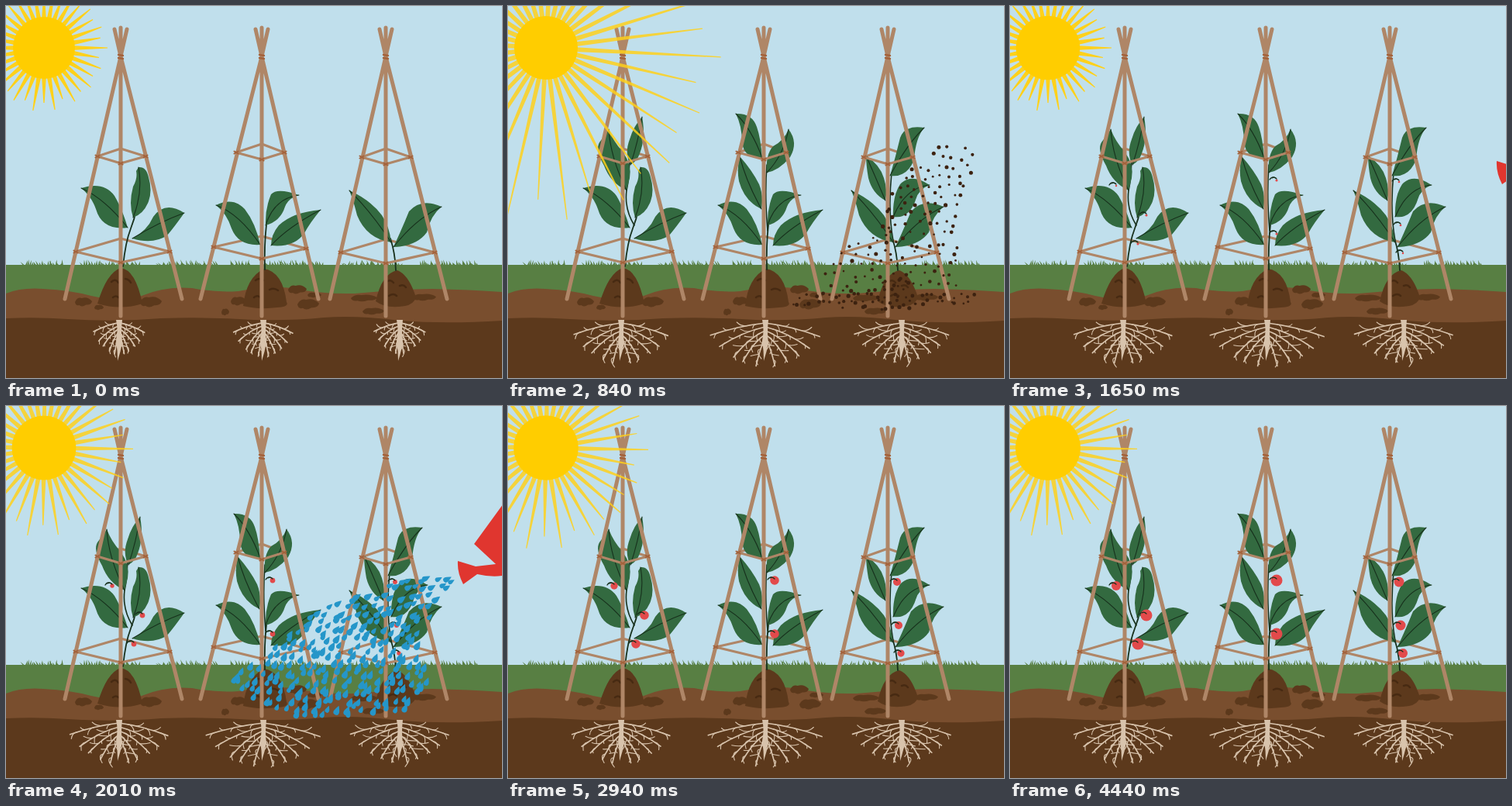
An HTML page that plays this animation: 640 px wide and 480 px high, repeating every 4710 ms.

```html
<!DOCTYPE html>
<html lang="en">
<head>
<meta charset="utf-8">
<title>Growing plants</title>
<style>
  html, body { margin: 0; width: 100%; height: 100%; overflow: hidden; background: #c0dfec; }
  svg { display: block; width: 640px; height: 480px; }
</style>
</head>
<body>
<svg id="stage" viewBox="0 0 640 480"></svg>
<script>
const LOOP = 4710;
const STEPS = [0, 180, 360, 480, 600, 720, 840, 990, 1110, 1230, 1440, 1650, 1770, 1890,
  2010, 2130, 2250, 2370, 2520, 2640, 2940, 3240, 3480, 3720, 3930, 4200, 4440];
const SOIL = '#5c391c', GREEN = '#587f43', POLE = '#af8667', LEAF = '#336a40', DARK = '#17301c';
const SUN = { x: 49, y: 54 };

function seeded(seed) {
  return () => (seed = (seed * 16807) % 2147483647) / 2147483647;
}

function track(t, keys) {
  if (t <= keys[0][0]) return keys[0][1];
  for (let i = 1; i < keys.length; i++) {
    const [t0, v0] = keys[i - 1], [t1, v1] = keys[i];
    if (t <= t1) return v0 + (v1 - v0) * (t - t0) / (t1 - t0);
  }
  return keys[keys.length - 1][1];
}

const path = (d, attrs) => `<path d="${d}" ${attrs}/>`;
const line = (d, color, width) =>
  path(d, `fill="none" stroke="${color}" stroke-width="${width}" stroke-linecap="round" stroke-linejoin="round"`);

// Leaves: outline from the tip, base point, vein control point; late ones grow from [start, end].
const plants = [
  {
    x: 148, spread: [-72, 79], root: [146, 62, 1],
    ties: [[118, 194, 184, 180, 194, 203], [90, 317, 300, 211, 317, 331]],
    stem: 'M151 336Q154 305 161 287Q166 275 168 262',
    shoot: 'M163 283Q150 262 153 238Q158 215 156 190',
    leaves: [
      ['M97 235Q126 226 140 245Q150 262 157 286Q124 290 116 262Q110 245 97 235', 157, 286, 127, 248],
      ['M171 208Q181 207 184 221Q189 238 184 252Q178 268 164 273Q158 255 164 233Q170 222 168 213', 164, 273, 177, 240],
      ['M230 267Q205 251 190 272Q182 290 163 300Q190 308 208 296Q218 284 230 267', 163, 300, 197, 279],
      ['M130 159Q136 175 148 188Q160 205 157 222L153 238Q132 228 124 206Q112 185 118 176Q124 168 130 159', 153, 238, 132, 195, 180, 600],
      ['M173 143Q178 170 170 190Q167 200 158 205Q150 190 157 172Q162 155 173 143', 158, 205, 168, 175, 480, 840]
    ],
    berries: [[137, 232, 6], [176, 270, 7.5], [165, 307, 7.5]]
  },
  {
    x: 330, spread: [-79, 73], root: [332, 72, 1],
    ties: [[297, 189, 178, 359, 189, 198], [268, 311, 297, 387, 313, 326]],
    stem: 'M334 340Q333 310 336 282',
    shoot: 'M335 290Q331 245 334 205',
    leaves: [
      ['M271 257Q293 246 308 262Q322 280 328 308Q300 310 291 287Q285 268 271 257', 328, 308, 301, 268],
      ['M378 244Q350 234 342 243Q334 262 335 283Q354 278 360 259Q364 248 378 244', 335, 283, 346, 248],
      ['M406 263Q370 266 352 283Q342 295 342 309Q372 312 385 293Q392 280 406 263', 342, 309, 364, 285],
      ['M299 194Q315 212 324 230Q330 245 327 262Q305 252 298 226Q295 210 299 194', 327, 262, 307, 226, 180, 600],
      ['M294 139Q315 138 321 156Q326 170 328 196Q305 198 302 176Q302 155 294 139', 328, 196, 314, 158, 480, 840],
      ['M362 159Q375 176 364 195Q350 212 334 215Q332 192 342 181Q356 174 362 159', 334, 215, 356, 192, 360, 840]
    ],
    berries: [[344, 225, 7.5], [344, 294, 7.5]]
  },
  {
    x: 490, spread: [-72, 79], root: [508, 62, .95],
    ties: [[459, 195, 184, 522, 195, 204], [432, 318, 301, 553, 318, 332]],
    stem: 'M503 341Q502 318 496 300',
    shoot: 'M497 303Q490 265 495 215',
    leaves: [
      ['M443 238Q470 250 485 270Q495 285 497 305Q465 300 453 270Q448 250 443 238', 497, 305, 470, 264],
      ['M562 259Q536 247 520 265Q512 285 500 311Q530 310 543 292Q548 270 562 259', 500, 311, 529, 274],
      ['M544 231Q520 215 506 230Q496 245 497 272Q518 275 526 250Q530 236 544 231', 497, 272, 513, 234, 180, 600],
      ['M462 193Q480 205 485 222Q490 238 487 251Q470 242 465 222Q462 205 462 193', 487, 251, 473, 218, 360, 720],
      ['M537 157Q512 153 506 170Q500 195 493 219Q515 222 524 198Q526 170 537 157', 493, 219, 515, 178, 480, 840]
    ],
    berries: [[502, 227, 6.5], [504, 283, 6.5], [507, 319, 6]]
  }
];

function grass() {
  const rnd = seeded(41);
  let d = 'M0 334';
  for (let x = 22; x < 618; x += 2.6) {
    if (Math.sin(x * .13) + Math.sin(x * .057) < -.75) continue;
    const lean = (rnd() - .5) * 7, h = 2 + rnd() * 5;
    d += `M${x} 335L${(x + lean).toFixed(1)} ${(334 - h).toFixed(1)}L${x + 2.6} 335`;
  }
  return path(d, `fill="${GREEN}"`);
}

function ground() {
  const clods = [[100, 382, 11, 5], [120, 389, 6, 3], [187, 382, 14, 6], [283, 395, 5, 4], [300, 381, 10, 5],
    [376, 366, 12, 5], [390, 385, 14, 6], [398, 373, 9, 3], [462, 377, 17, 4], [540, 376, 15, 4], [474, 394, 14, 4]];
  const mounds = 'M118 384Q130 344 148 338Q167 340 176 384Q148 393 118 384' +
    'M306 387Q310 350 333 339Q357 343 362 382Q366 388 350 389Q325 392 306 387' +
    'M477 381Q485 345 505 341Q520 347 529 376Q526 385 515 387Q490 391 477 381';
  const marks = 'M136 356q5-5 9 1M154 352q5 1 7 5M138 376q4-3 7 0M322 354q5-4 10 0M340 366q6-3 11 1' +
    'M320 376q5-4 9 1M491 356q5-4 9 1M508 361q5-2 8 2M494 374q6-4 10 0';
  return grass() +
    `<rect y="334" width="640" height="146" fill="${GREEN}"/>` +
    path('M0 371Q20 363 48 365Q85 367 110 374Q145 382 175 374Q205 361 240 364Q270 370 300 368' +
      'Q335 361 370 364Q405 372 450 371Q500 366 550 365Q600 366 640 369V480H0Z', 'fill="#794e2e"') +
    path('M0 403Q40 401 80 404Q140 408 200 403Q260 401 320 405Q370 406 410 402Q450 399 500 405Q560 411 640 406V480H0Z', `fill="${SOIL}"`) +
    clods.map(([x, y, w, h]) =>
      path(`M${x - w} ${y}q${w * .3} ${-h * 1.4} ${w * .8} ${-h}q${w * .7} ${-h * .5} ${w * 1.2} ${h * .8}` +
        `q${-w * .1} ${h} ${-w * .7} ${h * .9}q${-w * .5} ${h * .7} ${-w * .8} ${h * .1}q${-w * .4} ${h * .3} ${-w * .5} ${-h * .8}`,
        `fill="${SOIL}"`)).join('') +
    path(mounds, `fill="${SOIL}"`) + line(marks, '#472a12', 2.5);
}

function rootTwigs([x, reach, depth], seed) {
  const rnd = seeded(seed);
  let thick = '', thin = '';
  const put = (...n) => n.map(v => v.toFixed(1)).join(' ');
  for (const side of [-1, 1]) {
    for (let i = 0; i < 5; i++) {
      const y0 = 409 + i * 5, a = .18 + i * .27 + rnd() * .1;
      const len = reach * (1.04 - i * .09);
      const ex = x + side * Math.cos(a) * len, ey = y0 + Math.sin(a) * len * .58 * depth + 8;
      const mx = (x + ex) / 2, my = y0 + (ey - y0) * .25;
      thick += `M${put(x, y0)}Q${put(mx, my)} ${put(ex, ey)}`;
      for (let k = 1; k < 6; k++) {
        const u = k * .17, w = 1 - u;
        const px = w * w * x + 2 * w * u * mx + u * u * ex, py = w * w * y0 + 2 * w * u * my + u * u * ey;
        const b = a * .6 + (k % 2 ? .85 : -.55), l = 7 + rnd() * 9;
        const tx = px + side * Math.cos(b) * l, ty = Math.max(408, py + Math.sin(b) * l * .8);
        thin += `M${put(px, py)}Q${put(px + side * l * .5, py + 1)} ${put(tx, ty)}`;
      }
    }
  }
  const stroke = w => `fill="none" stroke="#d8c3ac" stroke-width="${w}" stroke-linecap="round" vector-effect="non-scaling-stroke"`;
  return path(thick, stroke(1.7)) + path(thin, stroke(1.1));
}

function plantMarkup(p, n) {
  const back = p.ties.map(([lx, ly, by, rx, ry]) => `M${lx} ${ly}L${p.x} ${by}L${rx} ${ry}`).join('');
  const front = p.ties.map(([lx, ly, , rx, ry, fy]) => `M${lx} ${ly}L${p.x} ${fy}L${rx} ${ry}`).join('');
  const knots = p.ties.map(([lx, ly, , rx, ry, fy]) =>
    [[lx, ly], [rx, ry], [p.x, fy]].map(([x, y]) => `M${x - 2.5} ${y - 1.5}l5 3M${x - 2.5} ${y + 1.5}l5-3`).join('')).join('');
  const leaves = p.leaves.map(([d, bx, by, cx, cy, start, end]) => {
    const tip = d.slice(0, d.indexOf('Q'));
    const grow = start === undefined ? '' : `data-x="${bx}" data-y="${by}" data-start="${start}" data-end="${end}"`;
    return `<g class="leaf" ${grow}>` + path(d, `fill="${LEAF}"`) + line(`${tip}Q${cx} ${cy} ${bx} ${by}`, DARK, 1.1) + '</g>';
  }).join('');
  const berries = p.berries.map(([x, y, r]) =>
    `<g class="berry">${line(`M${x - 9} ${y - 1}Q${x - 6} ${y - 6} ${x - 1} ${y - 3}`, DARK, 1.4)}` +
    `<circle data-r="${r}" cx="${x}" cy="${y}" fill="#e24a4b"/>` +
    line(`M${x - 6} ${y - 3}Q${x - 3} ${y - 5} ${x} ${y - 2}`, DARK, 1.2) + '</g>').join('');
  const [l, r] = p.spread, rx = p.root[0];
  return line(back, POLE, 3) + line(p.stem, DARK, 1.8) +
    `<g class="shoot">${line(p.shoot, DARK, 1.6)}</g>` + leaves + berries +
    line(front, POLE, 3.2) +
    line(`M${p.x + 8} 30L${p.x} 65L${p.x + l} 378M${p.x - 8} 30L${p.x} 65L${p.x + r} 378M${p.x} 28V400`, POLE, 5) +
    line(knots, '#a4623b', 2) +
    line(`M${p.x - 3} 63l6 1M${p.x - 3} 67l6 1`, '#a4623b', 2.4) +
    `<g class="roots" data-x="${rx}">${rootTwigs(p.root, 17 + n * 90)}</g>` +
    path(`M${rx - 4} 405H${rx + 4}Q${rx + 2} 422 ${rx + 4} 434Q${rx + 2} 446 ${rx - 2} 458Q${rx - 2} 444 ${rx - 4} 432Q${rx - 1} 418 ${rx - 4} 405`, 'fill="#d8c3ac"');
}

function inside(x, y, poly) {
  let hit = false;
  poly.forEach(([x1, y1], i) => {
    const [x2, y2] = poly[(i + 1) % poly.length];
    if (y1 > y !== y2 > y && x < x1 + (x2 - x1) * (y - y1) / (y2 - y1)) hit = !hit;
  });
  return hit;
}

// Staggered, jittered points that fill a polygon.
function scatter(poly, gap, seed) {
  const rnd = seeded(seed), points = [];
  for (let row = 0, y = 170; y < 402; y += gap, row++) {
    for (let x = 285 + (row % 2) * gap / 2; x < 615; x += gap) {
      const px = x + (rnd() - .5) * gap * .8, py = y + (rnd() - .5) * gap * .8, size = rnd();
      if (inside(px, py, poly)) points.push({ x: +px.toFixed(1), y: +py.toFixed(1), size });
    }
  }
  return points;
}

const grains = [
  ...scatter([[553, 178], [600, 184], [598, 220], [575, 290], [592, 362], [405, 362], [403, 338], [470, 285], [490, 235]], 12.5, 77),
  ...scatter([[362, 374], [410, 368], [500, 364], [560, 368], [608, 373], [598, 386], [540, 384], [515, 392], [430, 391], [365, 386]], 8.5, 9),
  ...scatter([[482, 366], [492, 350], [520, 350], [528, 366]], 9, 23)
];
const drops = scatter([[579, 214], [500, 229], [400, 262], [335, 322], [290, 344], [292, 386], [305, 399], [522, 399],
  [545, 352], [532, 300], [562, 248], [578, 228]], 11, 5);

const grainMarkup = grains.map(g =>
  `<circle class="grain" cx="${g.x}" cy="${g.y}" r="${(1.3 + g.size * 1.3).toFixed(1)}" fill="#3c2210"/>`).join('');
const dropMarkup = drops.map(d => {
  const turn = 22 + 42 * Math.max(0, Math.min(1, (330 - d.y) / 110));
  return `<path class="drop" d="M0-6.5Q3.6-.5 3.4 1.4A3.4 3.4 0 0 1-3.4 1.4Q-3.2-.5 0-6.5Z" fill="#2596c9"` +
    ` transform="translate(${d.x} ${d.y}) rotate(${turn.toFixed()}) scale(${(.8 + d.size * .35).toFixed(2)})"/>`;
}).join('');

const stage = document.getElementById('stage');
stage.innerHTML = '<rect width="640" height="480" fill="#c0dfec"/>' + ground() +
  plants.map(plantMarkup).join('') + grainMarkup + dropMarkup +
  path('M700 60L641 127L604 178L632 204L606 207L583 200Q582 215 590 230L608 217Q625 221 641 219L700 219Z', 'id="can" fill="#e0362f"') +
  `<path id="rays" fill="#ffd11a"/><circle id="disc" cx="${SUN.x}" cy="${SUN.y}" fill="#ffcd00"/>`;

const all = name => [...stage.querySelectorAll('.' + name)];
const parts = { leaf: all('leaf'), shoot: all('shoot'), berry: all('berry'), roots: all('roots'), grain: all('grain'), drop: all('drop') };
const rays = document.getElementById('rays'), disc = document.getElementById('disc'), can = document.getElementById('can');
const show = (el, on) => { el.style.display = on ? '' : 'none'; };
const scaleAbout = (el, x, y, sx, sy) =>
  el.setAttribute('transform', `translate(${x} ${y}) scale(${sx} ${sy}) translate(${-x} ${-y})`);

const RAY_LENGTH = [[0, 82], [480, 115], [840, 226], [1230, 132], [1440, 98], [1650, 82], [2010, 115], [2370, 225],
  [2640, 165], [2940, 132], [3240, 155], [3480, 115], [3720, 155], [3930, 115], [4200, 155], [4440, 115]];

function drawSun(t) {
  const length = track(t, RAY_LENGTH), offset = (length - 82) / 48;
  let d = '';
  for (let i = 0; i < 36; i++) {
    const a = (i * 10 + offset) * Math.PI / 180;
    const tip = length * (i % 2 ? .9 : 1) * (1 - (i * 7 % 5) * .012);
    const at = (r, w) => `${(SUN.x + r * Math.cos(a) - w * Math.sin(a)).toFixed(1)} ${(SUN.y + r * Math.sin(a) + w * Math.cos(a)).toFixed(1)}`;
    d += `M${at(36, 3)}L${at(tip, .6)}L${at(tip, -.6)}L${at(36, -3)}Z`;
  }
  rays.setAttribute('d', d);
  rays.setAttribute('opacity', length < 100 ? 1 : .84);
  disc.setAttribute('r', track(t, [[0, 40], [840, 41], [3480, 42]]));
}

function draw(t) {
  drawSun(t);
  for (const el of parts.leaf) {
    const { x, y, start, end } = el.dataset;
    if (start === undefined) continue;
    const s = track(t, [[+start, 0], [+end, 1]]);
    show(el, s > 0);
    scaleAbout(el, +x, +y, s, s);
  }
  parts.shoot.forEach((el, i) => {
    const s = track(t, [[180, 0], [600, 1]]);
    const [x, y] = plants[i].shoot.match(/\d+/g);
    show(el, s > 0);
    scaleAbout(el, +x, +y, s, s);
  });
  for (const el of parts.roots) {
    scaleAbout(el, +el.dataset.x, 407, track(t, [[0, .52], [840, .96], [1230, 1]]), track(t, [[0, .78], [840, 1]]));
  }
  const ripe = track(t, [[1440, 0], [1890, .45], [2520, .45], [3240, 1]]);
  for (const el of parts.berry) {
    show(el, ripe > 0);
    const fruit = el.querySelector('circle');
    fruit.setAttribute('r', fruit.dataset.r * ripe);
  }
  const fallHead = track(t, [[360, 170], [840, 400]]);
  const fallTail = track(t, [[840, 170], [990, 265], [1230, 362]]);
  parts.grain.forEach((el, i) => {
    const y = grains[i].y, settled = i >= grains.length - 10;
    show(el, t < 1650 && y <= fallHead && (y >= fallTail || settled));
  });
  const sprayHead = track(t, [[1650, -45], [2010, 240]]);
  const sprayTail = track(t, [[2010, -45], [2130, 5], [2370, 85], [2520, 150], [2640, 240]]);
  parts.drop.forEach((el, i) => {
    const far = drops[i].y - .44 * drops[i].x;
    show(el, far > sprayTail && far <= sprayHead);
  });
  show(can, t >= 1650 && t < 2130);
  can.setAttribute('transform', `translate(${track(t, [[1650, 45], [1890, 0]])} 0)`);
}

let shown = -1;
const begin = performance.now();
function tick() {
  const t = (performance.now() - begin) % LOOP;
  const step = STEPS.filter(s => s <= t).pop();
  if (step !== shown) draw(shown = step);
  requestAnimationFrame(tick);
}
tick();
</script>
</body>
</html>
```
